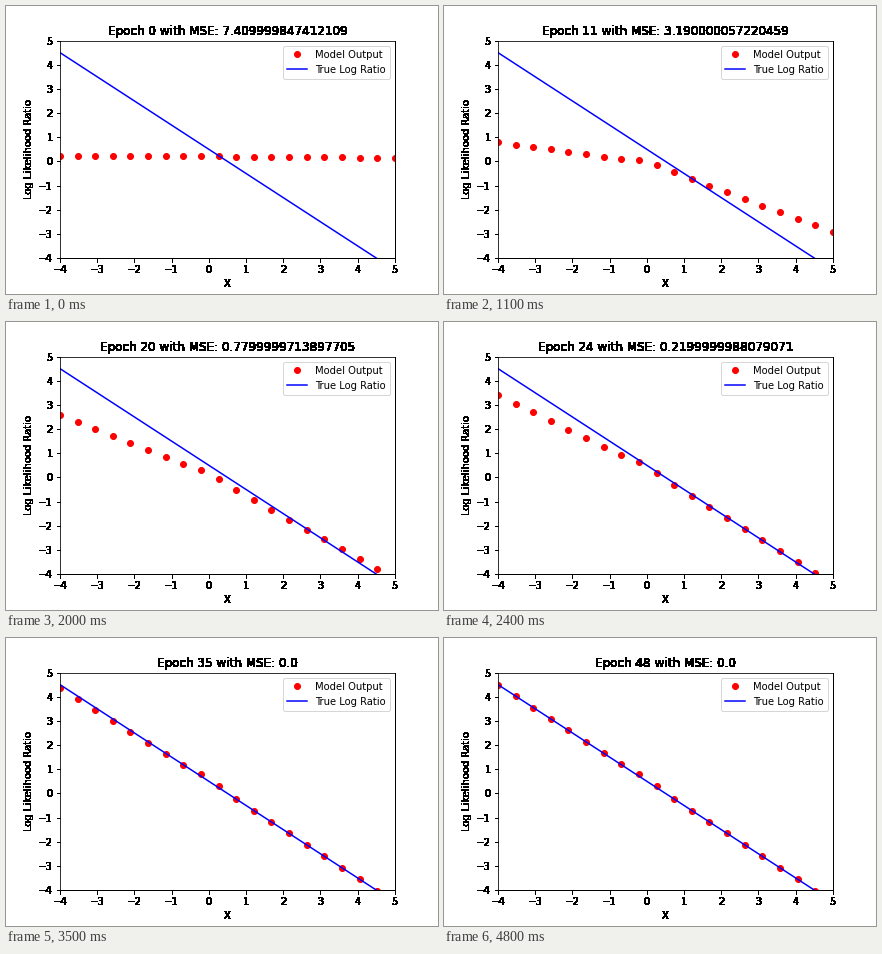
Recreate the animation shown at these times as a matplotlib script. Size 432 by 288 pixels, loop 4900 ms.

```python
import matplotlib.pyplot as plt
import numpy as np
from matplotlib.animation import FuncAnimation

EPOCHS = 49
x = np.linspace(-4, 5, 20)
true_ratio = 0.5 - x


def monotone(keys, values):
    """Smooth curve through key points that never overshoots them."""
    keys, values = np.array(keys, float), np.array(values, float)
    step = np.diff(keys)
    rise = np.diff(values) / step
    a, b = rise[:-1], rise[1:]
    mid = [2 * p * q / (p + q) if p * q > 0 else 0 for p, q in zip(a, b)]
    slope = np.array([rise[0], *mid, 0])

    def curve(t):
        k = np.clip(np.searchsorted(keys, t, side="right") - 1,
                    0, len(step) - 1)
        h = step[k]
        u = (t - keys[k]) / h
        v = 1 - u
        return ((1 + 2 * u) * v * v * values[k] + u * v * v * h * slope[k]
                + (1 + 2 * v) * u * u * values[k + 1]
                - u * u * v * h * slope[k + 1])

    return curve


# The gap to the true line has two straight arms that meet at x = 0
key_epochs = (0, 7, 12, 16, 24, 35, 48)
offset = monotone(key_epochs, (0.29, 0.40, 0.57, 0.62, 0.12, 0, 0))
left = monotone(key_epochs, (1, 0.92, 0.75, 0.56, 0.242, 0.034, 0))
right = monotone(key_epochs, (0.986, 0.816, 0.36, 0.265, 0.045, 0, 0))
error = monotone(key_epochs, (7.41, 5.48, 2.74, 1.71, 0.22, 0, 0))


def model(epoch):
    r = right(epoch)
    gap = (offset(epoch) + left(epoch) * np.maximum(-x, 0)
           - r * np.maximum(x, 0))
    bump = 0.1 * (1 - r) * np.exp(-(2 * x) ** 2)
    return true_ratio - gap + bump


def harden(img, dpi):
    """Turn every touched pixel solid black."""
    out = np.zeros_like(img)
    out[..., 3] = img[..., 3] > 0
    return out, 0, 0


fig, ax = plt.subplots(figsize=(6, 4), dpi=72, facecolor="white")
fig.subplots_adjust(left=0.125, right=0.9, bottom=0.125, top=0.88)
dots, = ax.plot(x, model(0), "ro", label="Model Output")
ax.plot(x, true_ratio, "b-", label="True Log Ratio")
ax.set(xlim=(-4, 5), ylim=(-4, 5), xlabel="X", ylabel="Log Likelihood Ratio",
       xticks=range(-4, 6), yticks=range(-4, 6))
ax.legend(loc="upper right")
for part in (ax.xaxis, ax.yaxis, ax.title,
             ax.spines["right"], ax.spines["bottom"]):
    part.set_agg_filter(harden)


def update(epoch):
    dots.set_ydata(model(epoch))
    mse = float(np.float32(round(error(epoch), 2)))
    ax.set_title(f"Epoch {epoch} with MSE: {mse}")
    return dots, ax.title


anim = FuncAnimation(fig, update, frames=EPOCHS, interval=100,
                     repeat=True, repeat_delay=0, blit=False)
plt.show()
```
